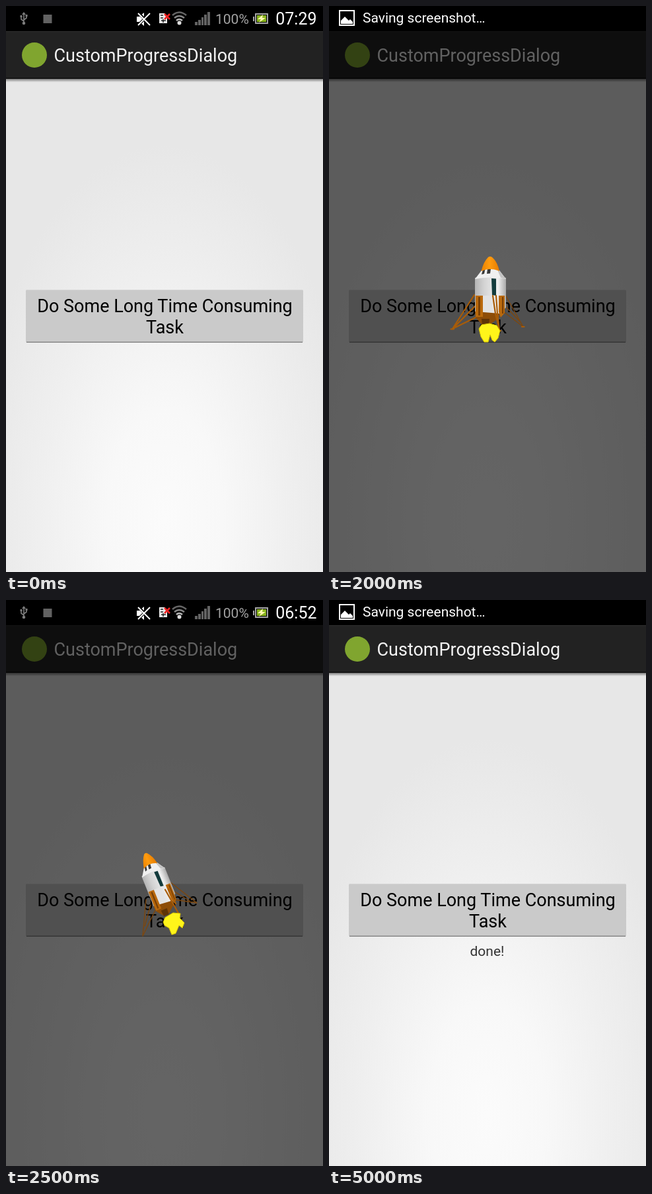
An HTML page that plays this animation: 480 by 854 pixels, repeating every 6000 ms.

```html
<!DOCTYPE html>
<html lang="en">
<head>
<meta charset="utf-8">
<title>Custom progress dialog</title>
<style>
  html, body { margin: 0; width: 100%; height: 100%; overflow: hidden; background: #000; }
  svg { display: block; width: 100%; height: 100%; }
  text { font-family: Roboto, sans-serif; }
  .line { fill: none; }
  .leg { fill: none; stroke: #a85c08; stroke-width: 2.2; stroke-linecap: round; stroke-linejoin: round; }
  .thin { stroke: #7d470e; stroke-width: 1.4; }
  [data-in] { visibility: hidden; }
  [data-in].on { visibility: visible; }
</style>
</head>
<body>
<svg viewBox="0 0 480 854" preserveAspectRatio="none">
  <defs>
    <radialGradient id="page" gradientUnits="userSpaceOnUse" cx="0" cy="0" r="1"
      gradientTransform="translate(240 775) scale(292 565)">
      <stop offset="0" stop-color="#fbfbfb"/>
      <stop offset=".3" stop-color="#f8f8f8"/>
      <stop offset=".65" stop-color="#efefef"/>
      <stop offset="1" stop-color="#e7e7e7"/>
    </radialGradient>
    <linearGradient id="shadow" x2="0" y2="1">
      <stop stop-opacity=".45"/><stop offset="1" stop-opacity="0"/>
    </linearGradient>
    <linearGradient id="hull">
      <stop stop-color="#b4b4b4"/><stop offset=".28" stop-color="#d2d2d2"/>
      <stop offset=".55" stop-color="#e4e4e4"/><stop offset=".75" stop-color="#eee"/>
      <stop offset="1" stop-color="#aaa"/>
    </linearGradient>
    <linearGradient id="cone">
      <stop stop-color="#e98200"/><stop offset=".45" stop-color="#ff9c10"/>
      <stop offset="1" stop-color="#e57c00"/>
    </linearGradient>

    <g id="picture">
      <path class="line" stroke="currentColor" stroke-width="2" d="M16 7H38V29H16Z"/>
      <path fill="currentColor" d="M18 27V22L24 16L30 22L32 20L36 24V27Z"/>
    </g>

    <g id="notices">
      <g class="line" stroke="#7c7c7c" stroke-width="1.6">
        <path d="M27 12V26M27 23L23 20V16M27 21L31 18V15"/>
      </g>
      <path fill="#7c7c7c" d="M27 9L30 13H24ZM21.5 14H24.5V17H21.5ZM29.5 13H32.5V16H29.5Z"/>
      <circle cx="27" cy="26" r="2.3" fill="#7c7c7c"/>
      <rect x="56.500" y="13" width="13" height="13" fill="#626262"/>
    </g>

    <g id="legs">
      <path class="leg" d="M187 487L220 436M187 487L224 469M191 483L222 452"/>
      <path class="leg thin" d="M294 484L267 436M294 484L264 461M289 476L266 452"/>
      <path class="leg" stroke-width="3" d="M184.500 487.500H189M292 484H295.500"/>
    </g>

    <g id="base">
      <path fill="#8d4d08" d="M221 461L258 464L257 471L243 481L231 480L222 470Z"/>
      <path fill="#b9690c" d="M222 437H233V469H222ZM257 437H266V463L260 470L257 462Z"/>
      <path fill="#794006" d="M226 439H229V467H226ZM262 439H264V464H262Z"/>
      <path fill="#5f3407" d="M231 472H243L242 482H232Z"/>
    </g>

    <g id="ship">
      <path fill="url(#hull)" d="M221 410Q244 404 268 410V455L258 464H233L221 461Z"/>
      <path fill="#e2e2e2" d="M233 437H246V464H233Z"/>
      <path fill="#f0f0f0" d="M231 399Q244 394 258 399L268 412Q244 407 221 412Z"/>
      <path fill="#c4c4c4" d="M255 398L258 399L268 412L260 410Z"/>
      <path fill="#383838" d="M233 398L236.500 397L235 404L231 405ZM240 397L245 396.500L244 403.500L239 404Z"/>
      <path fill="#133b3c" d="M246 411L253 411.500V437L247 436Z"/>
      <path fill="url(#cone)" d="M230.500 400Q234 386 241 379Q244 377 247 379Q255 386 258 400Q244 394 230.500 400Z"/>
      <use href="#base"/>
    </g>
    <path id="strut" class="leg" d="M248 437L252 464L258 489M253 437L255 464L258 489M255 490H260"/>
  </defs>

  <rect width="480" height="854" fill="url(#page)"/>
  <rect y="38" width="480" height="72" fill="#222"/>
  <path class="line" stroke="#303030" d="M0 38.500H480"/>
  <path class="line" stroke="#151515" stroke-width="2" d="M0 109H480"/>
  <rect y="110" width="480" height="5" fill="url(#shadow)"/>
  <circle cx="43" cy="74" r="19" fill="#80a52f"/>
  <text x="72.500" y="84" font-size="27" fill="#f3f3f3">CustomProgressDialog</text>

  <rect x="30" y="428" width="420" height="80" rx="2" fill="#cacaca"/>
  <path class="line" stroke="#d5d5d5" d="M31 428.500H449"/>
  <path class="line" stroke="#878787" stroke-width="1.500" d="M31 507.200H449"/>
  <g font-size="27" text-anchor="middle">
    <text x="240.500" y="462">Do Some Long Time Consuming</text>
    <text x="240.500" y="494">Task</text>
  </g>
  <text data-in="5" x="239.500" y="537" font-size="21" text-anchor="middle" fill="#333">done!</text>

  <rect data-in="1 2 3 4" y="38" width="480" height="816" fill-opacity=".6"/>

  <g data-in="1 2">
    <use href="#legs"/><use href="#ship"/><use href="#strut"/>
  </g>
  <path data-in="2" fill="#fff51a" stroke="#d9c400" d="M231 481L243 479L254 482L259 490L256 501L251 507L247 504L244 496L241 507L235 507L230 499L227 487Z"/>

  <g data-in="3">
    <path class="leg thin" d="M207 507L212 452M207 507L226 468M210 492L219 460M289 457L249 426M289 457L254 452M278 454L252 438"/>
    <use href="#ship" transform="translate(211 382) rotate(-22) scale(.8 .95) translate(-244 -378)"/>
    <path class="leg" d="M241 437L254 460L263 476M246 436L257 458"/>
    <path fill="#fff51a" stroke="#d9c400" d="M241 479L253 472L264 473L263 480L270 487L267 495L262 491L257 503L251 505L247 495L240 491L238 486Z"/>
  </g>

  <g data-in="4">
    <use href="#legs"/>
    <path class="leg thin" d="M230 416L235 411M271 441L287 460"/>
    <path fill="#cfcfcf" d="M229 418L246 409L268 431L259 450L249 470L233 472L222 450Z"/>
    <path fill="#e6e6e6" d="M235 439L248 438L246 466L234 464Z"/>
    <path fill="#f1f1f1" d="M239 414L257 404L278 426L276 439L261 427L246 419Z"/>
    <path fill="#333" d="M250 408L255 406L262 413L259 418ZM258 405L262 404L270 415L268 420Z"/>
    <path fill="#174042" d="M260 428L268 432L259 447L252 441Z"/>
    <path class="line" stroke="#343434" stroke-width="1.700" d="M229 427L239 425L244 428L251 423M240 426L236 433L230 433M244 428L250 436"/>
    <path fill="#ff9a0d" d="M257 407Q269 399 281 400Q285 402 284 408L278 426Q270 414 257 407Z"/>
    <path fill="#df7800" d="M284 404L278 426L274 420Q281 414 284 404Z"/>
    <use href="#base"/><use href="#strut"/>
  </g>

  <rect width="480" height="38"/>
  <g data-in="0 1 3 4">
    <use data-in="0 1 3" href="#notices"/>
    <g data-in="4">
      <use href="#picture" y="1" color="#8b8b8b"/>
      <use href="#notices" x="36"/>
    </g>

    <path fill="#fff" d="M198 16H202L209 10V30L202 24H198Z"/>
    <path class="line" stroke="#000" stroke-width="4" d="M201 11L218 28M201 28L218 11"/>
    <path class="line" stroke="#fff" stroke-width="2" d="M200 11L218 29M200 29L218 11"/>

    <path fill="#e8e8e8" d="M232 11H240L244 16V26H232Z"/>
    <path class="line" stroke="#222" stroke-width="1.500" d="M234 14H238M234 18H238M235 22H242M238 20V25"/>
    <path class="line" stroke="#f02020" stroke-width="2.600" d="M240 12L248 20M248 12L240 20"/>

    <g class="line" stroke-width="2.600">
      <path stroke="#666" d="M252 14Q262 5 273 14"/>
      <path stroke="#858585" d="M255 18Q262 12 270 18"/>
      <path stroke="#b5b5b5" d="M258 22Q262 18 267 22"/>
    </g>
    <circle cx="262.500" cy="25.500" r="3" fill="#ddd"/>

    <path fill="#626262" d="M286 24H290V29H286ZM291 21H295V29H291ZM296 17H299V29H296ZM300 13H304V29H300ZM305 9H309V29H305Z"/>

    <text x="317" y="27" font-size="21" fill="#a3a3a3">100%</text>

    <path class="line" stroke="#a4a4a4" stroke-width="2" d="M378 12H396V26H378ZM375 16V23"/>
    <path fill="#89b51c" d="M380 14H394V24H380Z"/>
    <path fill="#fff7b0" d="M389 13L381 20H386L383 25L393 18H388Z"/>

    <g font-size="25" fill="#fff" text-anchor="end">
      <text data-in="0" x="470.500" y="28">07:29</text>
      <text data-in="1 3" x="470.500" y="28">06:52</text>
      <text data-in="4" x="470.500" y="28">06:53</text>
    </g>
  </g>
  <g data-in="2 5" color="#fff">
    <use href="#picture"/>
    <text x="51" y="25" font-size="21" fill="#fff">Saving screenshot…</text>
  </g>
</svg>
<script>
  const LOOP = 6000;
  const starts = [0, 1500, 2000, 2500, 3000, 3500];
  const parts = [...document.querySelectorAll('[data-in]')].map(node => ({
    node, steps: node.dataset.in.split(' ').map(Number)
  }));
  let shown = -1;

  function show(step) {
    if (step === shown) return;
    shown = step;
    for (const { node, steps } of parts) node.classList.toggle('on', steps.includes(step));
  }

  function tick() {
    const time = performance.now() % LOOP;
    show(starts.findLastIndex(start => start <= time));
    requestAnimationFrame(tick);
  }
  tick();
</script>
</body>
</html>
```
